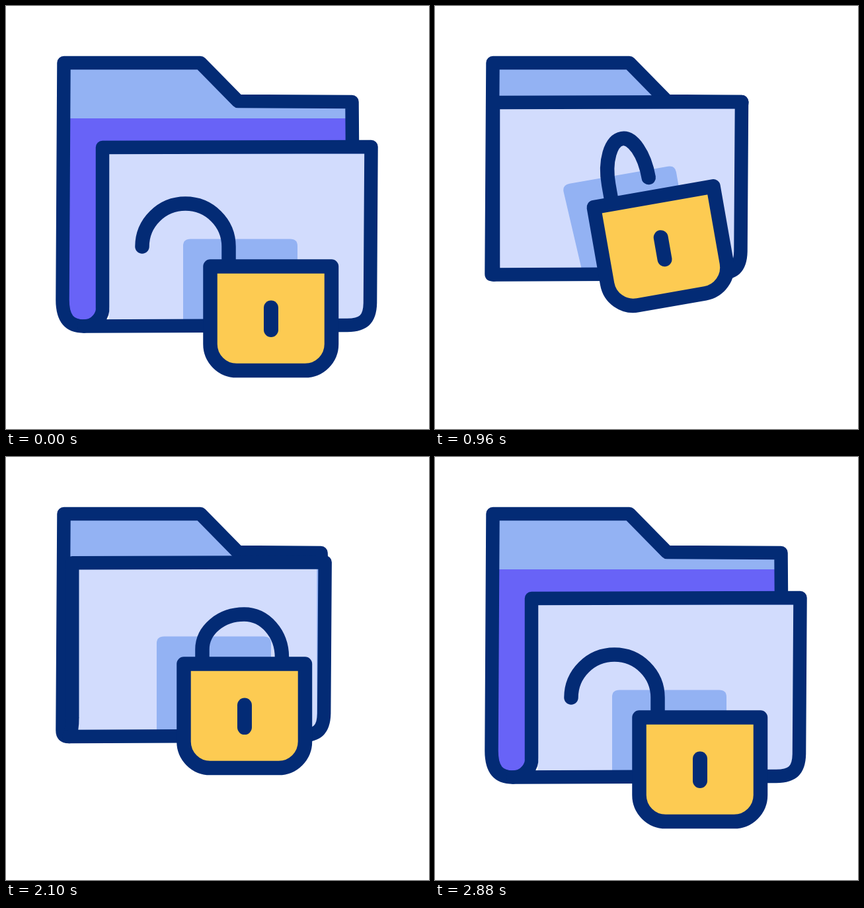
An HTML page with a canvas that plays this animation: 640 px wide and 640 px high, repeating every 3000 ms.

```html
<!DOCTYPE html>
<html lang="en">
<head>
<meta charset="utf-8">
<title>Folder lock</title>
<style>
html, body { margin: 0; width: 100%; height: 100%; overflow: hidden; background: #fff; }
canvas { display: block; width: 640px; height: 640px; }
</style>
</head>
<body>
<canvas id="stage" width="640" height="640"></canvas>
<script>
const LOOP = 3000;
const NAVY = '#032b75', BLUE = '#93b2f3', PURPLE = '#6863f7', PALE = '#d2dcfd', YELLOW = '#fdcb52';
const ctx = document.getElementById('stage').getContext('2d');

const mix = (a, b, k) => a + (b - a) * k;
const span = (t, a, b) => Math.min(1, Math.max(0, (t - a) / (b - a)));
const smooth = u => u * u * (3 - 2 * u);

// Ease with short handles: cubic-bezier(.167, 0, .833, 1)
function brisk(u) {
  let lo = 0, hi = 1;
  for (let i = 0; i < 24; i++) {
    const s = (lo + hi) / 2, r = 1 - s;
    const x = 3 * r * r * s * 0.167 + 3 * r * s * s * 0.833 + s * s * s;
    if (x < u) lo = s; else hi = s;
  }
  return smooth((lo + hi) / 2);
}

// Rises from 0 to 1 in the first interval and falls back in the second
const there = (t, ease, a, b, c, d) => ease(span(t, a, b)) - ease(span(t, c, d));

const SWING = [[680, 0], [920, -12], [1150, 12.3], [1310, -8], [1490, 8], [1700, 0]];
function swingAngle(t) {
  for (let i = 1; i < SWING.length; i++) {
    const [t0, a] = SWING[i - 1], [t1, b] = SWING[i];
    if (t >= t0 && t < t1) return mix(a, b, smooth(span(t, t0, t1))) * Math.PI / 180;
  }
  return 0;
}

function stroke(width) {
  ctx.strokeStyle = NAVY;
  ctx.lineWidth = width;
  ctx.lineJoin = ctx.lineCap = 'round';
  ctx.stroke();
}

function fill(color) {
  ctx.fillStyle = color;
  ctx.fill();
}

function polygon(points, color) {
  ctx.beginPath();
  points.forEach(([x, y]) => ctx.lineTo(x, y));
  ctx.closePath();
  fill(color);
}

function frontBox(p) {
  const left = mix(146, 88, p);
  return {
    left,
    top: mix(214, 146, p),
    right: mix(552.5, 464, p),
    bottom: mix(484.5, 406.5, p),
    middle: (left + 86) / 2 + 2,
    fold: mix(1, 0.03, p)
  };
}

function tracePage({ left, top, right, bottom, middle, fold }) {
  ctx.beginPath();
  ctx.moveTo(middle, bottom);
  ctx.bezierCurveTo(left - 8 * fold, bottom, left + fold, bottom - 18, left, bottom - 28);
  ctx.lineTo(left, top);
  ctx.lineTo(right, top - 1);
  ctx.lineTo(right - 1.5, bottom - 35);
  ctx.bezierCurveTo(right - 2, bottom - 10, right - 12, bottom - 2, right - 36, bottom - 1.5);
  ctx.closePath();
}

function traceBack(f, p) {
  const edge = mix(523.5, 464, p);
  ctx.beginPath();
  ctx.moveTo(edge + 0.5, f.top);
  ctx.lineTo(edge, 145);
  ctx.lineTo(351, 144);
  ctx.lineTo(294, 86);
  ctx.lineTo(87.5, 86);
  ctx.lineTo(85.5, f.bottom - 40 * f.fold);
  ctx.bezierCurveTo(85.5, f.bottom - 12 * f.fold, 85.5 + 10 * f.fold, f.bottom, f.middle, f.bottom);
}

function drawBack(f, p) {
  ctx.save();
  traceBack(f, p);
  ctx.lineTo(f.left, f.bottom - 28);
  ctx.lineTo(f.left, f.top);
  ctx.closePath();
  fill(BLUE);
  ctx.clip();
  ctx.fillStyle = PURPLE;
  ctx.fillRect(80, mix(170, 155, p), 460, 400);
  ctx.restore();

  traceBack(f, p);
  stroke(20.5);
}

// The paper follows the lock, so it trails slightly behind the outline.
function drawPaper(f, q) {
  tracePage(f);
  fill(BLUE);
  ctx.save();
  ctx.clip();
  ctx.fillStyle = '#fff';
  ctx.fillRect(f.left, f.top, 17, f.bottom - f.top);
  polygon([[f.left, f.top], [f.left + 200, f.top + 10], [f.left, f.top + 18]], '#fff');
  ctx.restore();

  const x = mix(156, 98, q), y = mix(224, 156, q);
  ctx.beginPath();
  ctx.roundRect(x - 0.5, y - 0.5, mix(545, 457, q) - x, mix(487, 410, q) - y, [0, 0, 14, 0]);
  fill(PALE);
}

function placeLock(q, angle) {
  ctx.translate(mix(309, 261.5, q), mix(394, 298, q));
  ctx.translate(27, 125);
  ctx.rotate(angle);
  ctx.translate(-27, -125);
}

function drawCard(f, q, angle, lean) {
  ctx.save();
  ctx.beginPath();
  ctx.rect(f.left, f.top, f.right - f.left, f.bottom - f.top - 8);
  ctx.clip();
  placeLock(q, angle);
  ctx.beginPath();
  ctx.moveTo(-41 + lean, 150);
  ctx.lineTo(-41, -31);
  ctx.quadraticCurveTo(-41, -41.5, -30, -41.5);
  ctx.lineTo(121, -41.5);
  ctx.quadraticCurveTo(132, -41.5, 132, -31);
  ctx.lineTo(132, 150);
  ctx.closePath();
  fill(BLUE);
  ctx.restore();
}

// One quarter of an arch on each side of the apex; the fixed leg stays taller when shut.
function drawShackle(flip, drop) {
  const reach = mix(-131, 120.5, flip);
  const apexX = 28 + reach * mix(0.5, 0.525, flip), apexY = mix(-95, -75, drop);
  const fixedY = mix(-30, -22, drop), freeY = mix(-30, -10, drop);
  const round = 0.5523;
  ctx.beginPath();
  ctx.moveTo(28, 0);
  ctx.lineTo(28, fixedY);
  ctx.bezierCurveTo(28, mix(fixedY, apexY, round), mix(apexX, 28, round), apexY, apexX, apexY);
  ctx.bezierCurveTo(mix(apexX, 28 + reach, round), apexY, 28 + reach, mix(freeY, apexY, round), 28 + reach, freeY);
  stroke(21.5);
}

function drawLock(q, angle, flip, drop) {
  ctx.save();
  placeLock(q, angle);
  drawShackle(flip, drop);

  ctx.beginPath();
  ctx.roundRect(0, 0, 183.5, 157.5, [0, 0, 40, 40]);
  fill(YELLOW);
  stroke(21.5);

  ctx.beginPath();
  ctx.moveTo(92, 62.5);
  ctx.lineTo(92, 96);
  stroke(22);
  ctx.restore();
}

function draw(t) {
  const shut = there(t, brisk, 300, 633, 1845, 2855);
  const moved = there(t, smooth, 300, 680, 1840, 2880);
  const flip = there(t, smooth, 680, 1090, 2130, 2690);
  const drop = there(t, smooth, 1090, 1300, 2130, 2720);
  const lean = 11 * there(t, smooth, 300, 700, 920, 1150);
  const angle = swingAngle(t);
  const front = frontBox(shut);

  ctx.fillStyle = '#fff';
  ctx.fillRect(0, 0, 640, 640);
  drawBack(front, shut);
  drawPaper(front, moved);
  drawCard(front, moved, angle, lean);
  tracePage(front);
  stroke(20.5);
  drawLock(moved, angle, flip, drop);
}

const start = performance.now();
function tick() {
  draw((performance.now() - start) % LOOP);
  requestAnimationFrame(tick);
}
tick();
</script>
</body>
</html>
```
